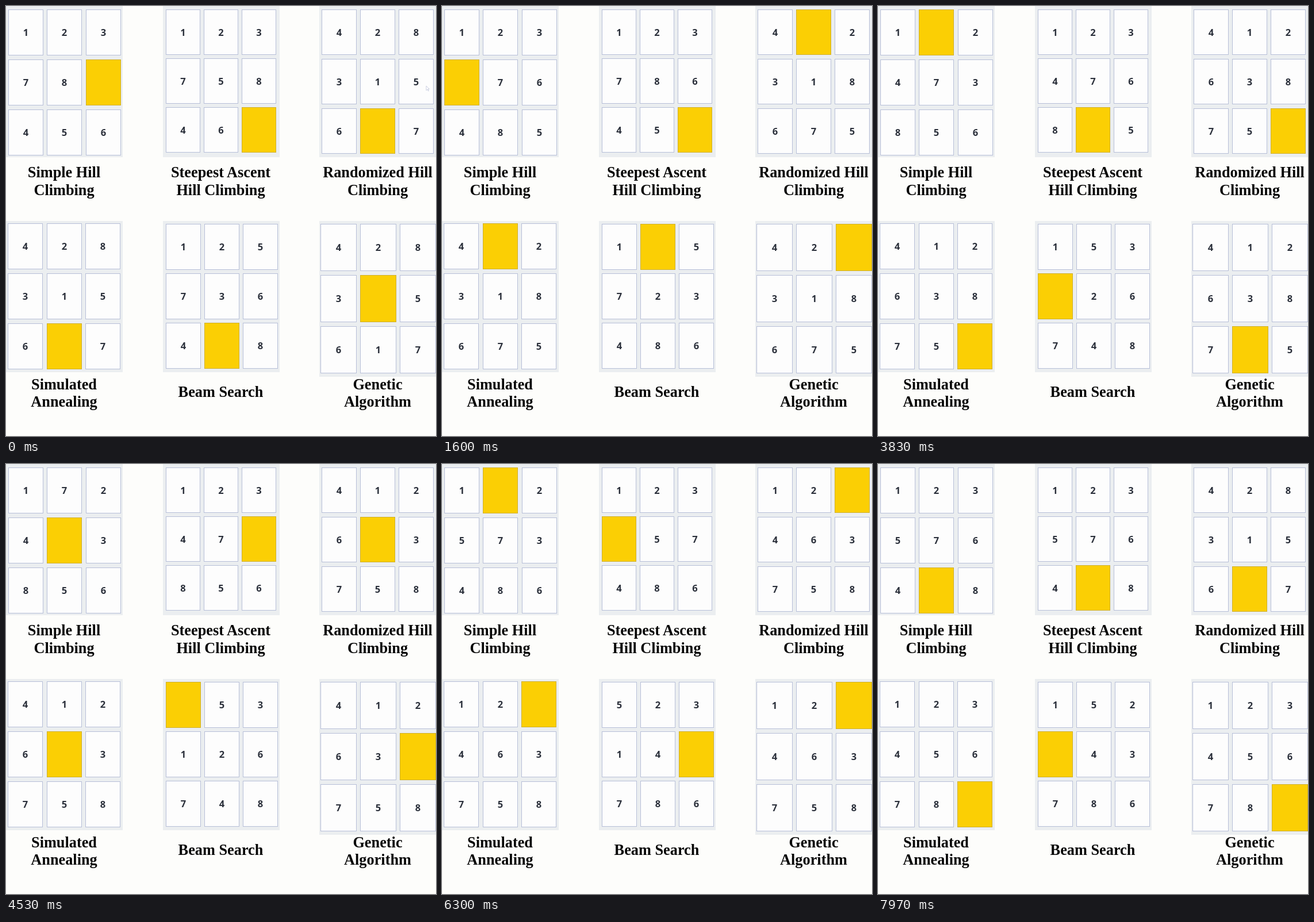
An HTML page that plays this animation: 748 px wide and 748 px high, repeating every 8 s.

```html
<!DOCTYPE html>
<html lang="en">
<head>
<meta charset="utf-8">
<title>Sliding puzzle search</title>
<style>
  html, body { margin: 0; width: 100%; height: 100%; overflow: hidden; background: #fdfdfb; }
  svg { display: block; width: 100vw; height: 100vh; }
  text { text-anchor: middle; }
  .panel { fill: #ebeef0; }
  .tile { fill: #fdfdfd; stroke: #b7bfd8; }
  .tile.blank { fill: #fbcf04; stroke: #cfb02c; }
  .digit { font: 700 16.5px "Open Sans", "Noto Sans", sans-serif; fill: #2b303b; }
  .caption { font: 700 26.3px "Liberation Serif", serif; fill: #060606; }
</style>
</head>
<body>
<svg id="stage" viewBox="0 0 748 748"></svg>
<script>
const LOOP = 8000, STEP = 400;
const SHIFT = { U: -3, D: 3, L: -1, R: 1 };
const SVG_NS = 'http://www.w3.org/2000/svg';
const stage = document.getElementById('stage');

// panel: x, y, w, h; tiles: first x, first y, pitch x, pitch y, w, h
// lead: ms by which the puzzle's first move comes early
// moves: directions in which the blank travels; "0" restores the start
const puzzles = [
  { caption: ['Simple Hill', 'Climbing'], center: 101, baseline: 298,
    panel: [0, 0, 203, 263], tiles: [4.5, 6.5, 67.4, 87, 60, 79],
    start: '12378_456', moves: 'DLULDRRUULDDLURURDDL', lead: 260 },
  { caption: ['Steepest Ascent', 'Hill Climbing'], center: 373.5, baseline: 298,
    panel: [273, 0, 203, 263], tiles: [278.5, 6.5, 66, 85.2, 59, 78],
    start: '12375846_', moves: 'LURDLULDRRULDLURRDL', lead: 15 },
  { caption: ['Randomized Hill', 'Climbing'], center: 646.5, baseline: 298,
    panel: [545, 0, 203, 263], tiles: [549.5, 6.5, 67, 86, 60, 78],
    start: '4283156_7', moves: 'RUULDLDRRULLURRDLDR0', lead: 65 },
  { caption: ['Simulated', 'Annealing'], center: 101, baseline: 666.5,
    panel: [0, 374, 203, 263], tiles: [3.5, 378.5, 67.5, 87, 60, 79],
    start: '4283156_7', moves: 'RUULDLDRRULLURRDLDR', lead: 20 },
  { caption: ['Beam Search'], center: 373.5, baseline: 679.5,
    panel: [273, 374, 203, 263], tiles: [278.5, 379.5, 67, 86, 60, 79],
    start: '1257364_8', moves: 'RULURDDLLUURDDRUULLD', lead: 260 },
  { caption: ['Genetic', 'Algorithm'], center: 646.5, baseline: 666.5,
    panel: [545, 374, 203, 271], tiles: [547.5, 379.5, 69, 89, 62, 81],
    start: '4283_5617', moves: 'DRUULDLDRRULLURRDLDR', lead: 150 },
];

function add(name, attributes, text = '') {
  const node = document.createElementNS(SVG_NS, name);
  for (const key in attributes) node.setAttribute(key, attributes[key]);
  node.textContent = text;
  return stage.appendChild(node);
}

function addRect(className, x, y, width, height) {
  return add('rect', { class: className, x, y, width, height });
}

// Pixel centre, so that one-pixel outlines stay sharp.
const snap = value => Math.floor(value) + 0.5;

// All boards the puzzle passes through, one per move.
function playMoves({ start, moves }) {
  const boards = [start];
  let board = start;
  for (const move of moves) {
    if (move === '0') {
      board = start;
    } else {
      const cells = [...board];
      const from = board.indexOf('_'), to = from + SHIFT[move];
      [cells[from], cells[to]] = [cells[to], cells[from]];
      board = cells.join('');
    }
    boards.push(board);
  }
  return boards;
}

for (const puzzle of puzzles) {
  const [x0, y0, pitchX, pitchY, w, h] = puzzle.tiles;
  addRect('panel', ...puzzle.panel);
  puzzle.cells = Array.from({ length: 9 }, (_, i) => {
    const x = snap(x0 + (i % 3) * pitchX), y = snap(y0 + Math.floor(i / 3) * pitchY);
    return {
      tile: addRect('tile', x, y, w, h),
      digit: add('text', { class: 'digit', x: x + w / 2, y: y + h / 2 + 6 }),
    };
  });
  puzzle.caption.forEach((line, i) =>
    add('text', { class: 'caption', x: puzzle.center, y: puzzle.baseline + 30.5 * i }, line));
  puzzle.boards = playMoves(puzzle);
}

const pointer = add('path', {
  d: 'M731 139v8l2-2 1.5 3 1-.5-1.5-3h2.5z', fill: '#fdfdff', stroke: '#b9bfd6', 'stroke-width': 0.7,
});

function draw(now) {
  const time = now % LOOP;
  for (const { boards, cells, lead } of puzzles) {
    const step = Math.floor((time + lead) / STEP);
    const board = boards[Math.min(step, boards.length - 1)];
    cells.forEach(({ tile, digit }, i) => {
      const blank = board[i] === '_';
      tile.classList.toggle('blank', blank);
      digit.textContent = blank ? '' : board[i];
    });
  }
  pointer.style.display = time < 200 ? '' : 'none';
}

const origin = performance.now();
function tick() {
  draw(performance.now() - origin);
  requestAnimationFrame(tick);
}
tick();
</script>
</body>
</html>
```
